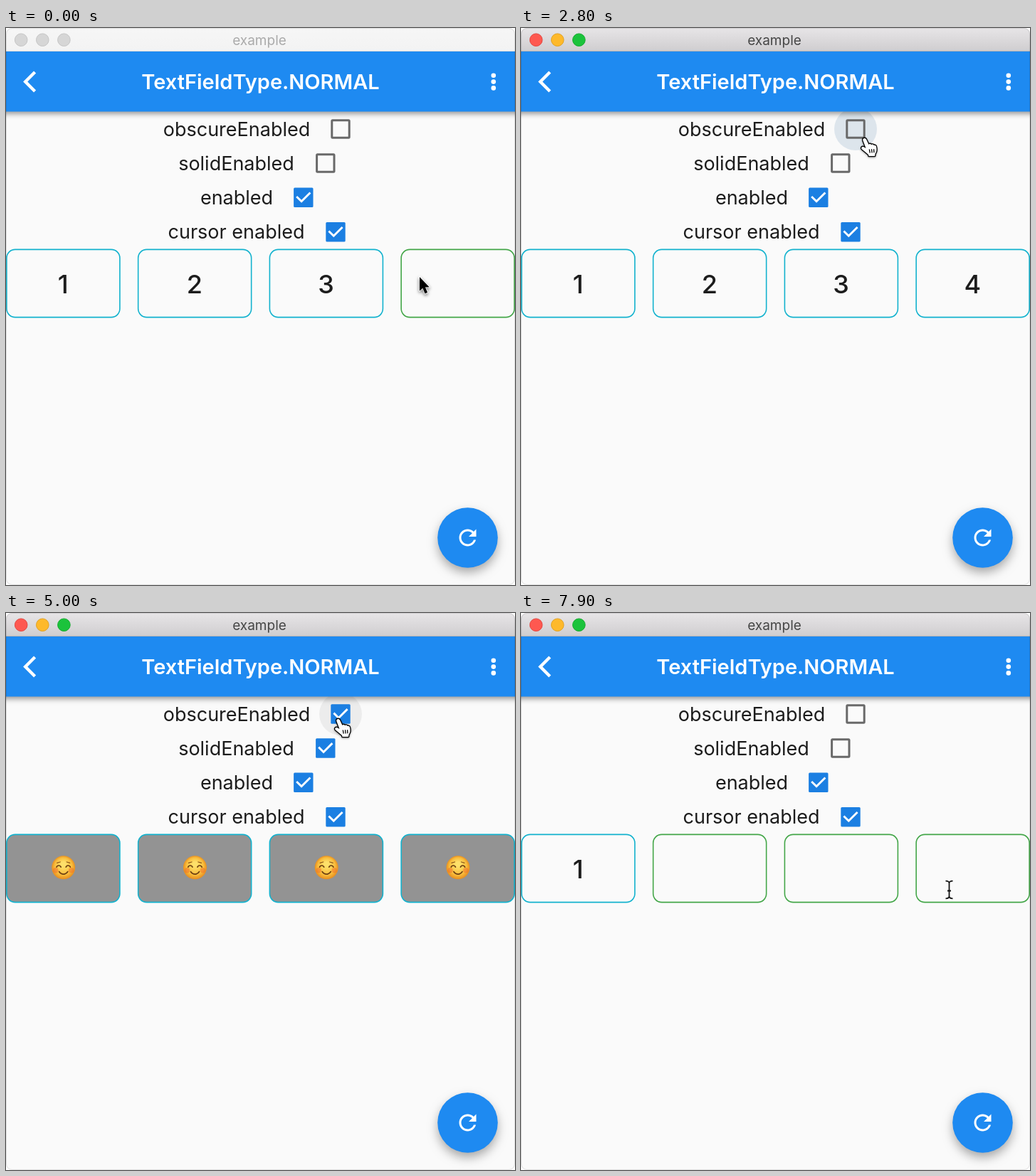
Animation, 715 px wide and 783 px high, one loop 8 s. Source, as an HTML page with a canvas:

```html
<!DOCTYPE html>
<html lang="en">
<head>
<meta charset="utf-8">
<title>example</title>
<style>
  html, body { margin: 0; width: 100%; height: 100%; overflow: hidden; background: #fff; }
  canvas { display: block; }
</style>
</head>
<body>
<canvas id="stage" width="715" height="783"></canvas>
<script>
const W = 715, H = 783, LOOP = 8000, STEP = 100;
const ctx = document.getElementById('stage').getContext('2d');
const BLUE = '#1e8af1', INK = '#1c1c1c', PAGE = '#fafafa';
const FONT = 'Inter, Roboto, sans-serif';

const ACTIVE_AT = 600;
const ROWS = [
  { label: 'obscureEnabled', tx: 324, base: 151.5, x: 470, y: 142, flips: [2860, 3500, 4750, 5400] },
  { label: 'solidEnabled', tx: 323.5, base: 199.5, x: 448.8, y: 190, flips: [4300, 5860] },
  { label: 'enabled', tx: 324, base: 248, x: 417.8, y: 238.3, flips: [-1000] },
  { label: 'cursor enabled', tx: 323.5, base: 296, x: 463, y: 286.8, flips: [-1000] }
];
// Typing interval of each digit
const DIGITS = [[-1, LOOP], [-1, 7700], [-1, 7400], [1400, 7200]];
const PRESSES = [[600, 800], [2700, 2800], [3400, 3500], [4200, 4300],
                 [4650, 4750], [5300, 5400], [5750, 5850], [6900, 7000]];
const PATH = [
  [0, 581, 350], [500, 581, 350], [600, 585, 356], [1600, 585, 356],
  [2500, 482, 157], [3500, 482, 157], [3800, 467, 163], [4100, 455, 191],
  [4350, 455, 191], [4650, 466, 151], [5400, 466, 151], [5750, 452, 187],
  [6100, 452, 187], [6800, 601.5, 389], [LOOP, 601.5, 389]
];

const REFRESH = new Path2D('M17.65 6.35C16.2 4.9 14.21 4 12 4c-4.42 0-7.99 3.58-7.99 8s3.57 8 7.99 8' +
  'c3.73 0 6.84-2.55 7.73-6h-2.08c-.82 2.33-3.04 4-5.65 4-3.31 0-6-2.69-6-6s2.69-6 6-6' +
  'c1.66 0 3.14.69 4.22 1.78L13 11h7V4z');
const ARROW = new Path2D('M0 0V19.5L4.4 15.4 7.6 23.2 11 21.8 7.8 14.2H13.6Z');
const HAND = new Path2D('M3.5 4.5C2 1 6.5-.5 8 2.5L11.5 10C12 8.5 14.5 8.5 15 10.2C16 9 18 9.3 18.5 11' +
  'C19.5 10.2 21.8 11 22 13C23 17 22.5 20 20.5 23L20 26H11.5L11 24C8 21.5 5 19 2 16.5' +
  'C0 14.5 2 12 4.5 13.2L7.5 15Z');
const CREASES = new Path2D('M12.3 16.5l.9 5.2M15.5 16.3l.6 5.2M18.6 16.2l.3 5');
const BEAM = new Path2D('M-5-12.3C-2-12.3 0-11 0-9V9C0 11-2 12.3-5 12.3M5-12.3C2-12.3 0-11 0-9M0 9C0 11 2 12.3 5 12.3M-2.5 1.5H2.5');

const clamp = v => Math.max(0, Math.min(1, v));
const ease = v => v * v * (3 - 2 * v);
const within = (t, [a, b]) => t >= a && t < b;
const isOn = (row, t) => row.flips.filter(f => f <= t).length % 2 === 1;

function checkLevel(row, t) {
  const last = row.flips.filter(f => f <= t).pop();
  if (last === undefined) return 0;
  const p = clamp((t - last) / 200);
  return isOn(row, t) ? p : 1 - p;
}

function pointerAt(t) {
  const i = PATH.findIndex(k => k[0] > t);
  const [t0, x0, y0] = PATH[i - 1], [t1, x1, y1] = PATH[i];
  const p = ease((t - t0) / (t1 - t0));
  return { x: x0 + (x1 - x0) * p, y: y0 + (y1 - y0) * p };
}

function circle(x, y, r, fill, stroke, width = 1) {
  ctx.beginPath();
  ctx.arc(x, y, r, 0, Math.PI * 2);
  if (fill) { ctx.fillStyle = fill; ctx.fill(); }
  if (stroke) { ctx.strokeStyle = stroke; ctx.lineWidth = width; ctx.stroke(); }
}

function line(points, color, width) {
  ctx.beginPath();
  points.forEach(([x, y]) => ctx.lineTo(x, y));
  ctx.strokeStyle = color;
  ctx.lineWidth = width;
  ctx.stroke();
}

function box(x, y, w, h, r) {
  ctx.beginPath();
  ctx.roundRect(x, y, w, h, r);
}

function text(str, x, y, size, weight, color) {
  ctx.font = `${weight} ${size}px ${FONT}`;
  ctx.textAlign = 'center';
  ctx.fillStyle = color;
  ctx.fillText(str, x, y);
}

function shadow(blur, dy, alpha) {
  ctx.shadowColor = `rgba(0,0,0,${alpha})`;
  ctx.shadowBlur = blur;
  ctx.shadowOffsetY = dy;
}

function titleBar(active) {
  const g = ctx.createLinearGradient(0, 0, 0, 33);
  g.addColorStop(0, active ? '#e7e5e7' : '#f6f6f6');
  g.addColorStop(1, active ? '#cfcdcf' : '#f3f3f3');
  ctx.fillStyle = g;
  ctx.fillRect(0, 0, W, 33);
  ctx.fillStyle = active ? '#b5b3b5' : '#dcdcdc';
  ctx.fillRect(0, 32, W, 1);
  const fills = active ? ['#fe5850', '#feb92b', '#1bc33c'] : ['#d6d6d6', '#d6d6d6', '#d6d6d6'];
  const rims = active ? ['#e2463f', '#e0a020', '#13aa2c'] : ['#c4c4c4', '#c4c4c4', '#c4c4c4'];
  fills.forEach((c, i) => circle(21.2 + i * 30.1, 16.7, 8.8, c, rims[i]));
  text('example', 356, 23.5, 19, 400, active ? '#464646' : '#ababab');
}

function appBar() {
  ctx.save();
  shadow(7, 3, 0.38);
  ctx.fillStyle = BLUE;
  ctx.fillRect(-10, 33, W + 20, 84.5);
  ctx.restore();
  line([[40.6, 62], [27.2, 75.5], [40.6, 89]], '#fff', 4.4);
  text('TextFieldType.NORMAL', 357.5, 86, 29, 600, '#fff');
  [66.8, 75.6, 84.4].forEach(y => circle(684.8, y, 3.3, '#fff'));
}

function checkbox(row, p) {
  const { x, y } = row, s = 27.4, left = x - s / 2, top = y - s / 2;
  if (p > 0) {
    const hole = (s - 6) * clamp(1 - p * 2);
    box(left, top, s, s, 1.5);
    ctx.rect(x - hole / 2, y - hole / 2, hole, hole);
    ctx.fillStyle = '#1b7fe2';
    ctx.fill('evenodd');
  } else {
    box(left + 1.5, top + 1.5, s - 3, s - 3, 1);
    ctx.strokeStyle = '#696969';
    ctx.lineWidth = 3;
    ctx.stroke();
  }
  const q = p * 2 - 1;
  if (q <= 0) return;
  const at = (u, v) => [left + u * s, top + v * s];
  const a = clamp(q * 2), b = clamp(q * 2 - 1);
  const pts = [at(0.15, 0.45), at(0.15 + 0.25 * a, 0.45 + 0.25 * a)];
  if (b > 0) pts.push(at(0.4 + 0.45 * b, 0.7 - 0.45 * b));
  line(pts, '#fff', 2.9);
}

function smiley(x, y) {
  const g = ctx.createRadialGradient(x, y - 5, 3, x, y, 17);
  g.addColorStop(0, '#fde06a');
  g.addColorStop(0.65, '#f9bd3c');
  g.addColorStop(1, '#e58a1c');
  circle(x, y, 16.5, g);
  [-1, 1].forEach(d => {
    circle(x + d * 11, y + 4, 3.8, 'rgba(238,100,40,.45)');
    ctx.lineCap = 'round';
    ctx.beginPath();
    ctx.arc(x + d * 6.6, y + 0.5, 3.3, Math.PI * 1.12, Math.PI * 1.88);
    ctx.strokeStyle = '#6d4012';
    ctx.lineWidth = 1.7;
    ctx.stroke();
    line([[x + d * 4.5, y - 7.8], [x + d * 9, y - 6.5]], '#8a5518', 1.3);
  });
  ctx.beginPath();
  ctx.arc(x, y + 2.5, 6.8, Math.PI * 0.16, Math.PI * 0.84);
  ctx.strokeStyle = '#6d4012';
  ctx.lineWidth = 1.8;
  ctx.stroke();
  ctx.lineCap = 'butt';
}

function fields(t) {
  const hidden = isOn(ROWS[0], t), solid = isOn(ROWS[1], t);
  DIGITS.forEach((span, i) => {
    const x = 0.9 + i * 184.75, filled = within(t, span);
    box(x, 311.4, 159, 95.2, 12);
    if (solid) { ctx.fillStyle = '#939393'; ctx.fill(); }
    ctx.strokeStyle = filled ? '#12b2ce' : '#43a648';
    ctx.lineWidth = 1.6;
    ctx.stroke();
    if (!filled) return;
    if (hidden) smiley(x + 79.8, 357.8);
    else text(i + 1, x + 79.2, 373, 36, 500, INK);
  });
}

function refreshButton() {
  ctx.save();
  shadow(14, 7, 0.32);
  circle(648.5, 716.5, 42.3, BLUE);
  ctx.restore();
  ctx.save();
  ctx.translate(630.5, 698.5);
  ctx.scale(1.5, 1.5);
  ctx.fillStyle = '#fff';
  ctx.fill(REFRESH);
  ctx.restore();
}

function outlined(path, fill, rim, width) {
  ctx.strokeStyle = rim;
  ctx.lineWidth = width;
  ctx.stroke(path);
  ctx.fillStyle = fill;
  ctx.fill(path);
}

function pointer(p, hovered, active, pressed) {
  const overField = p.y > 311 && p.y < 407 && p.x % 184.75 < 160;
  if (pressed) circle(p.x - 0.5, p.y, 25.2, null, '#000', 2.2);
  ctx.save();
  ctx.lineJoin = 'round';
  ctx.translate(p.x, p.y);
  if (hovered) {
    ctx.translate(-5, -3);
    shadow(3, 1, 0.3);
    outlined(HAND, '#fff', '#000', 2.6);
    ctx.shadowColor = 'transparent';
    ctx.strokeStyle = '#000';
    ctx.lineWidth = 1.3;
    ctx.stroke(CREASES);
  } else if (active && overField) {
    ctx.strokeStyle = '#fff';
    ctx.lineWidth = 3.6;
    ctx.stroke(BEAM);
    ctx.strokeStyle = '#111';
    ctx.lineWidth = 1.8;
    ctx.stroke(BEAM);
  } else {
    shadow(4, 2, 0.35);
    outlined(ARROW, '#000', '#fff', 2.6);
  }
  ctx.restore();
}

function draw(t) {
  const active = t >= ACTIVE_AT;
  const p = pointerAt(t);
  const hovered = ROWS.find(r => Math.abs(p.x - r.x) < 30 && Math.abs(p.y - r.y) < 24);
  const splash = PRESSES.some(([a, b]) => t >= a && t < b + 50);

  ctx.clearRect(0, 0, W, H);
  ctx.save();
  box(0, 0, W, H, 8);
  ctx.clip();
  ctx.fillStyle = PAGE;
  ctx.fillRect(0, 0, W, H);

  if (hovered) {
    circle(hovered.x, hovered.y, 30, 'rgba(0,0,0,.055)');
    if (splash) circle(hovered.x, hovered.y, 30, 'rgba(30,138,241,.07)');
  }
  ROWS.forEach(r => {
    text(r.label, r.tx, r.base, 27, 400, INK);
    checkbox(r, checkLevel(r, t));
  });
  fields(t);
  appBar();
  titleBar(active);
  refreshButton();
  ctx.restore();

  box(0.5, 0.5, W - 1, H - 1, 8);
  ctx.strokeStyle = 'rgba(0,0,0,.1)';
  ctx.lineWidth = 1;
  ctx.stroke();
  pointer(p, hovered, active, PRESSES.some(s => within(t, s)));
}

function tick() {
  const t = performance.now() % LOOP;
  draw(Math.floor(t / STEP) * STEP);
  requestAnimationFrame(tick);
}
tick();
</script>
</body>
</html>
```
